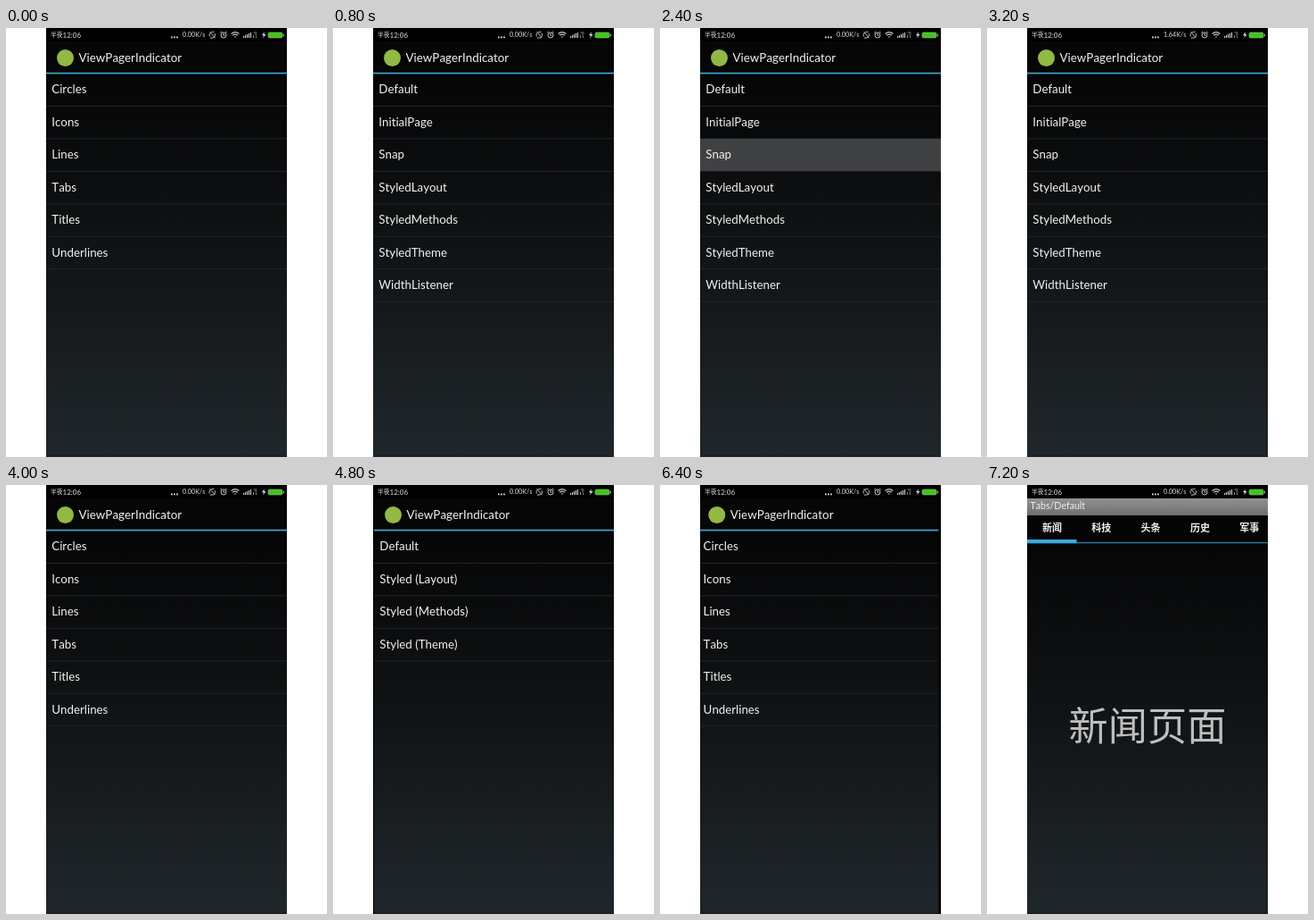
These frames come from a looping animation (360x480 px, 8 s). An HTML page:

```html
<!DOCTYPE html>
<html lang="en">
<head>
<meta charset="utf-8">
<title>Pager demo</title>
<style>
  html, body { margin: 0; width: 100%; height: 100%; overflow: hidden; background: #fff; }
  svg {
    display: block; width: 360px; height: 480px;
    font-family: Lato, "Noto Sans CJK SC", "Noto Sans CJK", sans-serif;
    font-kerning: none; font-variant-ligatures: none;
  }
  .cjk { font-family: "Noto Sans CJK SC", "Noto Sans CJK", sans-serif; }
</style>
</head>
<body>
<svg id="stage" viewBox="0 0 360 480">
  <defs>
    <linearGradient id="bg" x1="0" y1="50" x2="0" y2="480" gradientUnits="userSpaceOnUse">
      <stop offset="0" stop-color="#050506"/>
      <stop offset=".3" stop-color="#0c0e0f"/>
      <stop offset=".65" stop-color="#161a1d"/>
      <stop offset="1" stop-color="#20272b"/>
    </linearGradient>
    <linearGradient id="bar" x1="0" y1="0" x2="0" y2="1">
      <stop offset="0" stop-color="#929292"/>
      <stop offset="1" stop-color="#6e6e6e"/>
    </linearGradient>
    <radialGradient id="glow" cx="1100" cy="240" r="811" gradientUnits="userSpaceOnUse">
      <stop offset=".967" stop-color="#fff" stop-opacity=".06"/>
      <stop offset=".989" stop-color="#fff" stop-opacity=".12"/>
      <stop offset="1" stop-color="#fff" stop-opacity=".03"/>
    </radialGradient>
    <clipPath id="phone"><rect x="45" y="0" width="270" height="480"/></clipPath>
    <clipPath id="body"><rect x="45" y="52" width="270" height="428"/></clipPath>
  </defs>
  <rect width="360" height="480" fill="#fff"/>
  <g clip-path="url(#phone)">
    <rect x="45" width="270" height="480" fill="#000"/>
    <g id="screen"></g>
    <rect x="45" width="270" height="15" fill="#000"/>
    <g fill="#ddd">
      <text class="cjk" x="50" y="10.4" font-size="6.8" font-weight="500">半夜</text>
      <text x="63.5" y="10.6" font-size="8">12:06</text>
      <rect x="185" y="9.5" width="1.8" height="1.8"/>
      <rect x="188" y="9.5" width="1.8" height="1.8"/>
      <rect x="191" y="9.5" width="1.8" height="1.8"/>
      <text id="speed" x="223.3" y="10.4" font-size="7.2" text-anchor="end"></text>
    </g>
    <g fill="none" stroke="#c4c4c4" stroke-width="1">
      <path d="M228.500 9.500A3.200 3.200 0 0 1 231.500 4.600L233.500 4.300M234 6A3.200 3.200 0 0 1 231 11L229 11.200M228.500 4.500L234.500 11"/>
      <circle cx="244" cy="8" r="3"/>
      <path d="M244 6V8.200H245.500M240.300 5.300L242 3.800M247.700 5.300L246 3.800"/>
      <path d="M252.600 6.500Q257 2.700 261.400 6.500M254.200 8.300Q257 6 259.800 8.300" stroke-width="1.300"/>
      <path d="M255.600 9.500H258.400L257 11.100Z" fill="#c4c4c4" stroke="none"/>
      <path d="M266.500 9V11M268.500 8V11M270.500 7V11M272.500 6V11M274.500 5V11" stroke-width="1.200"/>
      <path d="M277.500 5H281.500M279 7H281.500M277.500 8V11M280.500 8.500V11" stroke="#888"/>
    </g>
    <path d="M290 4L287 8.300H289L288 11.500L291.500 7H289.300Z" fill="#ddd"/>
    <rect x="294" y="5" width="16" height="6" rx="1.500" fill="#3fc51c" stroke="#8fae88" stroke-width=".7"/>
    <rect x="310.800" y="6.700" width="1.200" height="2.700" fill="#8fae88"/>
  </g>
</svg>
<script>
const STEP = 800, LOOP = 8000, ROW = 36.45, TOP = 51;
const screen = document.getElementById("screen");
const speed = document.getElementById("speed");

const rect = (x, y, w, h, fill) =>
  `<rect x="${x}" y="${y}" width="${w}" height="${h}" fill="${fill}"/>`;
const text = (x, y, size, str, more = "") =>
  `<text x="${x}" y="${y}" font-size="${size}" fill="#f1f1f1" ${more}>${str}</text>`;
const cjk = (x, y, size, str, more) =>
  text(x, y, size, str, `class="cjk" text-anchor="middle" ${more}`);

const base = () => rect(45, 15, 270, 465, "url(#bg)") + rect(45, 478, 270, 2, "#1b1e22");

const header = title =>
  rect(45, 15, 270, 35, "#060607") +
  `<circle cx="66.5" cy="33.5" r="9.5" fill="#91b943"/>` +
  text(81.5, 37.6, 13.4, title) +
  rect(45, 49.8, 270, 1.6, "#3fabdc");

function list(items, pressed = -1) {
  const rows = items.map((item, i) => {
    const y = TOP + i * ROW;
    return (i === pressed ? rect(45, y, 270, ROW, "#404142") : "") +
      rect(45, y + ROW - 0.5, 270, 1, "#222528") +
      text(51.3, y + 22.4, 13.3, item);
  });
  return base() + header("ViewPagerIndicator") + rows.join("");
}

function circlesPage(current) {
  let s = base() + header("Circles/Default");
  for (let i = 0; i < 3; i++) s += rect(292, 26 + i * 5.5, 3.6, 3.6, "#999");
  s += `<circle cx="1100" cy="240" r="811" fill="url(#glow)" clip-path="url(#body)"/>`;
  s += cjk(180, 270, 44, "指示器", 'style="fill:#bebebe"');
  for (let i = 0; i < 4; i++) {
    s += `<circle cx="${169 + i * 6.6}" cy="469.5" r="2.3" stroke="#ddd" stroke-width=".9" fill="${i === current ? "#fff" : "none"}"/>`;
  }
  return s;
}

function tabsPage() {
  const tabs = ["新闻", "科技", "头条", "历史", "军事"];
  return base() +
    rect(45, 15, 270, 19, "url(#bar)") +
    text(48.5, 27.4, 10.6, "Tabs/Default") +
    rect(45, 34, 270, 31, "#050506") +
    tabs.map((t, i) => cjk(73 + i * 55.3, 52.3, 11, t, 'font-weight="700"')).join("") +
    rect(45, 64, 270, 1.2, "#2d86ad") +
    rect(45, 61, 55.5, 4.2, "#3ba9e0") +
    cjk(180, 285.5, 44.2, "新闻页面", 'style="fill:#bebebe"');
}

const shift = (dx, s) => `<g transform="translate(${dx} 0)">${s}</g>`;

const main = list(["Circles", "Icons", "Lines", "Tabs", "Titles", "Underlines"]);
const circleItems = ["Default", "InitialPage", "Snap", "StyledLayout",
  "StyledMethods", "StyledTheme", "WidthListener"];
const circles = list(circleItems);
const lines = list(["Default", "Styled (Layout)", "Styled (Methods)", "Styled (Theme)"]);

const scenes = [
  main, circles, circlesPage(3), list(circleItems, 2), circles,
  main, shift(1, lines), main, shift(-2.7, main), tabsPage()
];

let shown = -1;
function draw(ms) {
  const i = Math.floor((ms % LOOP) / STEP);
  if (i === shown) return;
  shown = i;
  screen.innerHTML = scenes[i];
  speed.textContent = i === 4 ? "1.64K/s" : "0.00K/s";
}

let start;
function tick(now) {
  start ??= now;
  draw(Math.max(0, now - start));
  requestAnimationFrame(tick);
}
draw(0);
requestAnimationFrame(tick);
</script>
</body>
</html>
```
